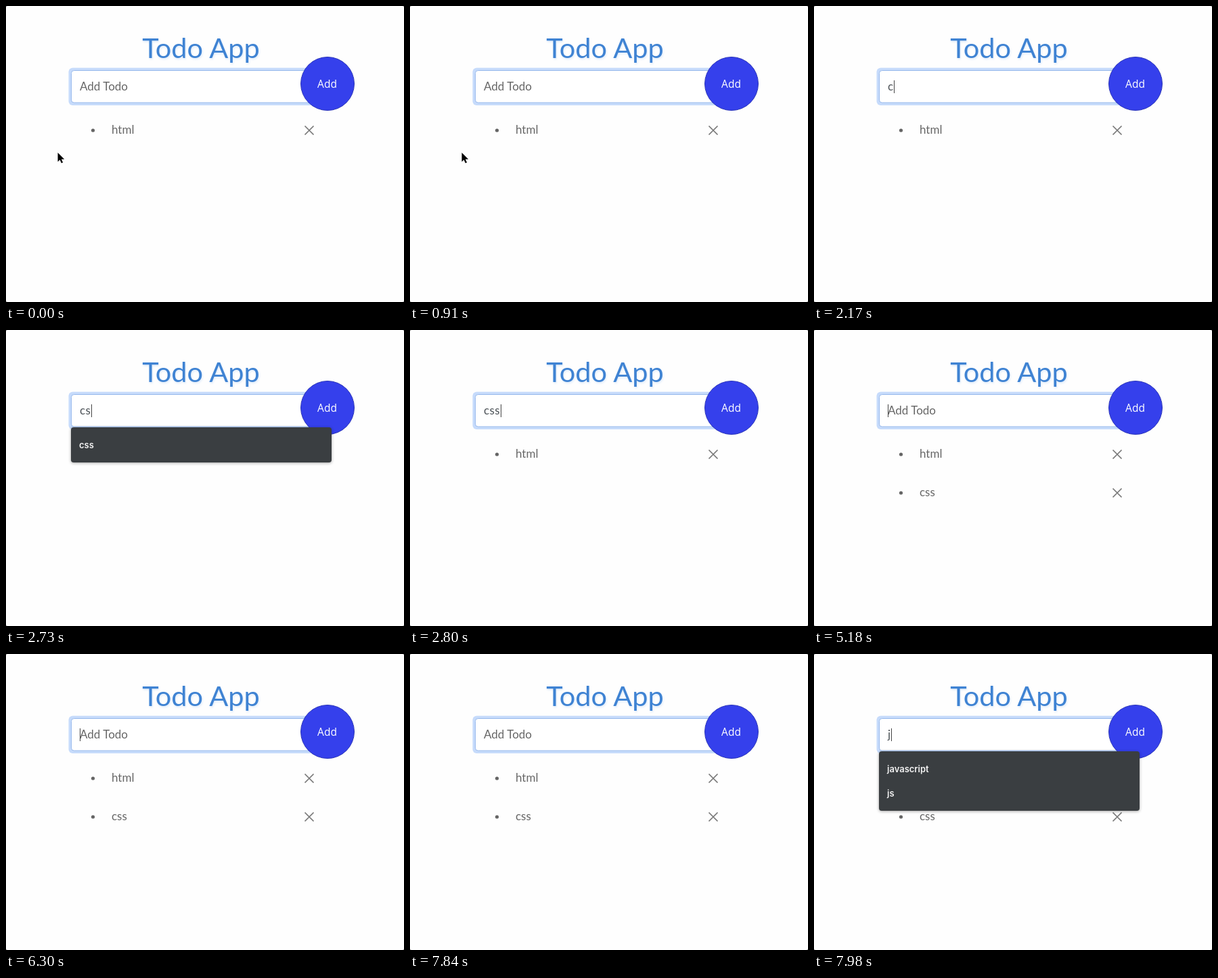
An HTML page that plays this animation: 588x438 px, repeating every 8 s.

```html
<!DOCTYPE html>
<html lang="en">
<head>
<meta charset="utf-8">
<title>Todo App</title>
<style>
  html, body { margin: 0; width: 100%; height: 100%; overflow: hidden; background: #8a8a8a; }
  svg { display: block; width: 588px; height: 438px; }
  text { font: 17px Lato, "Open Sans", sans-serif; fill: #666; white-space: pre; }
  .title { font-size: 41.5px; fill: #3f83d3; text-anchor: middle; text-shadow: 1px 2px 3px rgba(70, 140, 230, .16); }
  .add { font: 500 15.5px "Open Sans", "Noto Sans", sans-serif; fill: #fff; text-anchor: middle; }
  .typed { fill: #4c5257; letter-spacing: .4px; }
  .option { font: 600 13px Inter, Roboto, sans-serif; fill: #f3f3f3; }
  .cross { stroke: #787878; stroke-width: 1.7; fill: none; }
  .menu-box { fill: #3a3e41; filter: drop-shadow(0 1px 2px rgba(0, 0, 0, .35)); }
</style>
</head>
<body>
<svg viewBox="0 0 588 438">
  <rect width="588" height="438" rx="2.5" fill="#fefefe"/>
  <text class="title" x="288" y="77">Todo App</text>

  <g id="list"></g>

  <rect x="92.5" y="91.5" width="392" height="55.5" rx="6" fill="#c6dbfb"/>
  <rect x="96.5" y="95.5" width="384" height="47.5" rx="4" fill="#fff" stroke="#97b9ec"/>
  <text id="placeholder" x="109" y="125">Add Todo</text>
  <text id="typed" class="typed" x="109" y="125"></text>
  <rect id="caret" y="110" width="1" height="19" fill="#444"/>

  <circle cx="475" cy="115" r="39.5" fill="#3540ec" stroke="#2b35b8"/>
  <text class="add" x="474.5" y="121">Add</text>

  <g id="menu"></g>

  <path id="pointer" d="M76.5 217v13.4l3.1-2.9 2.2 5 2.3-1-2.2-4.8h4.3z"
        fill="#000" stroke="#fff" stroke-width="1" paint-order="stroke"/>
</svg>
<script>
  const LOOP = 8000;
  const $ = id => document.getElementById(id);

  // Each track is a list of [start time, value]; the value holds until the next entry.
  const typing = [[0, ""], [2170, "c"], [2520, "cs"], [2800, "css"], [4200, ""], [7980, "j"]];
  const suggestions = [[0, []], [2240, ["css"]], [2800, []], [7980, ["javascript", "js"]]];
  const todos = [[0, ["html"]], [4200, ["html", "css"]]];
  const caretToggles = [420, 910, 1470, 1960, 2170, 3290, 3850, 4690,
                        5180, 5740, 6300, 6790, 7280, 7840, 7980];
  const POINTER_HIDES = 2170;

  const valueAt = (track, t) => track.filter(([start]) => start <= t).pop()[1];

  function todoRow(label, i) {
    const y = 184 + i * 57;
    return `<circle cx="128.5" cy="${y}" r="2.6" fill="#666"/>
      <text x="156" y="${y + 5.3}">${label}</text>
      <path class="cross" d="M441.5 ${y - 6.5}l13 13m0-13l-13 13"/>`;
  }

  function menuMarkup(options) {
    if (!options.length) return "";
    const rows = options.map((label, i) =>
      `<text class="option" x="108" y="${175 + i * 36}">${label}</text>`);
    return `<rect class="menu-box" x="96" y="144" width="385" height="${16 + options.length * 36}" rx="4"/>`
      + rows.join("");
  }

  const show = (id, visible) => $(id).setAttribute("visibility", visible ? "visible" : "hidden");

  let previous = "";

  function render(t) {
    const text = valueAt(typing, t);
    const options = valueAt(suggestions, t);
    const items = valueAt(todos, t);
    const caretOn = caretToggles.filter(time => time <= t).length % 2 === 1;
    const pointerOn = t < POINTER_HIDES;

    const state = JSON.stringify([text, options, items, caretOn, pointerOn]);
    if (state === previous) return;
    previous = state;

    $("typed").textContent = text;
    $("list").innerHTML = items.map(todoRow).join("");
    $("menu").innerHTML = menuMarkup(options);
    const textWidth = text ? $("typed").getComputedTextLength() + 0.5 : 0;
    $("caret").setAttribute("x", Math.round(109 + textWidth));
    show("placeholder", !text);
    show("caret", caretOn);
    show("pointer", pointerOn);
  }

  const began = performance.now();
  function tick() {
    render((performance.now() - began) % LOOP);
    requestAnimationFrame(tick);
  }
  tick();
</script>
</body>
</html>
```
